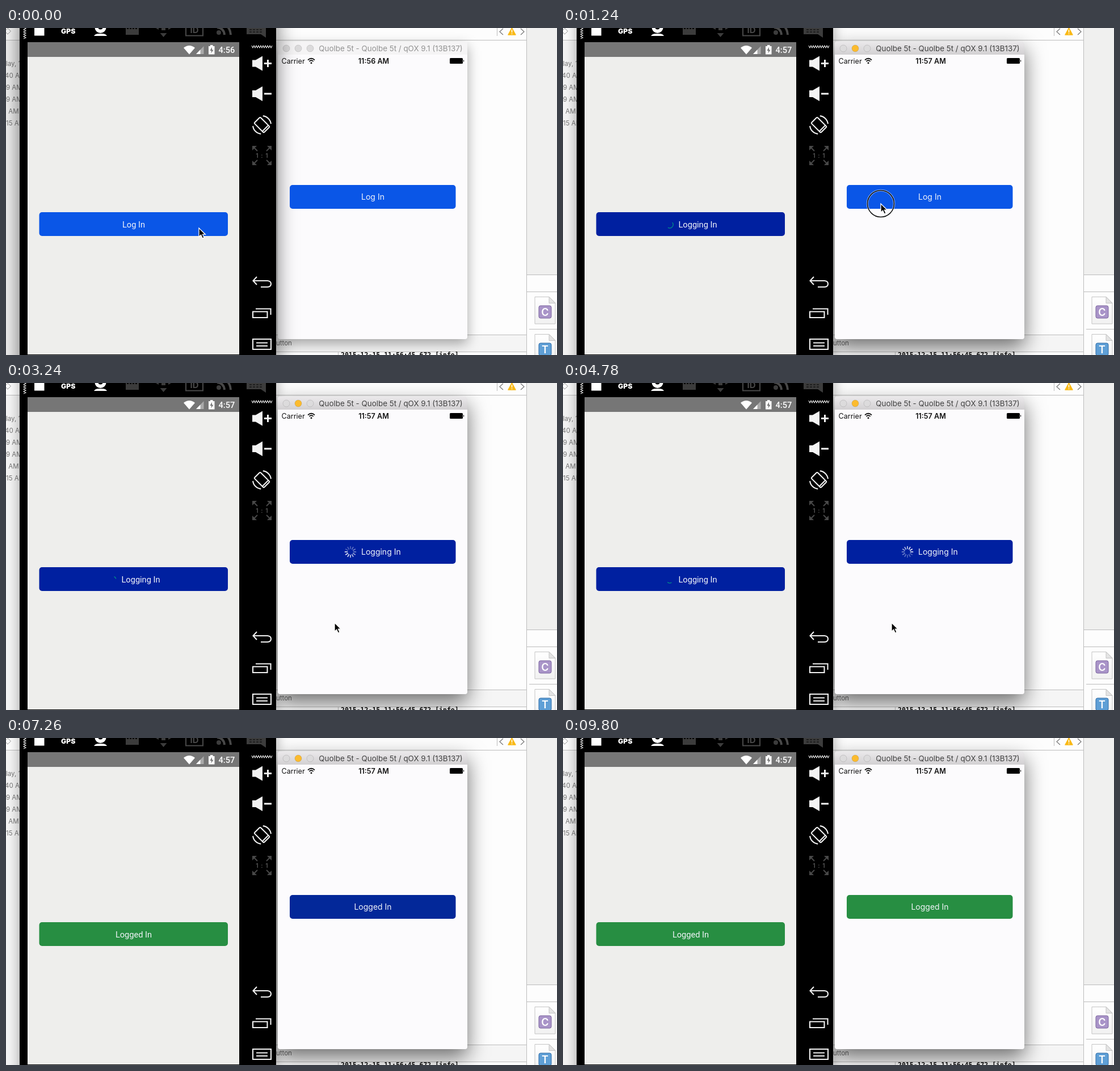
An HTML page for the animation above (9820 ms loop, 971 px wide and 577 px high).

```html
<!DOCTYPE html>
<html lang="en">
<head>
<meta charset="utf-8">
<title>Log in buttons</title>
<style>
html, body { margin: 0; width: 100%; height: 100%; overflow: hidden; background: #fdfdfd; }
svg { display: block; width: 971px; height: 577px; }
text { white-space: pre; }
.sf { font-family: Inter, sans-serif; }
.rb { font-family: Roboto, sans-serif; }
.mono { font-family: "DejaVu Sans Mono", monospace; }
.line { fill: none; stroke: #bcbcbc; }
.white { fill: none; stroke: #f0f0f0; stroke-width: 2.1; }
.dim { fill: none; stroke: #484848; stroke-width: 2; }
.mid { text-anchor: middle; }
.label { fill: #f3f5fa; }
.back { filter: drop-shadow(0 8px 11px rgba(0,0,0,.34)); }
.front { filter: drop-shadow(0 14px 18px rgba(0,0,0,.56)); }
</style>
</head>
<body>
<svg viewBox="0 0 971 577">
  <defs>
    <linearGradient id="bar" x2="0" y2="1">
      <stop stop-color="#ebe9eb"/><stop offset="1" stop-color="#d2d0d2"/>
    </linearGradient>
    <linearGradient id="page" x2="0" y2="1">
      <stop stop-color="#fff"/><stop offset="1" stop-color="#f1f1f1"/>
    </linearGradient>
  </defs>

  <!-- desktop behind the windows -->
  <rect width="971" height="577" fill="#fdfdfd"/>
  <rect y="22" width="24" height="555" fill="#f4f4f4"/>
  <path class="line" d="M0 21.500H917M865.500 0V14"/>
  <path d="M-2 5.500L3 .5L8.500 5.500L3 11Z" fill="none" stroke="#999"/>
  <g id="times" class="sf" font-size="11.5" fill="#777"></g>
  <path d="M876 1L870 6.500L876 12M907 1L913 6.500L907 12" fill="none" stroke="#777" stroke-width="1.2"/>
  <path d="M891.500 0L898 12H885Z" fill="#f9b916" stroke="#f9b916" stroke-width="1.5" stroke-linejoin="round"/>
  <path d="M891.500 3V8M891.500 9.500V11" stroke="#fff" stroke-width="1.5"/>
  <rect x="476" y="541" width="441" height="30" fill="#f5f5f5"/>
  <path class="line" d="M476 541.500H917M476 571.500H917M585.500 571V577"/>
  <text class="sf" x="476" y="560" font-size="11.5" fill="#666">utton</text>
  <text class="mono" x="590" y="581" font-size="11.5" font-weight="bold" fill="#111">2015-12-15 11:56:45.672 [info]</text>
  <rect x="918" width="53" height="436" fill="#f0f0ef"/>
  <path class="line" d="M917.500 0V577M918 435.500H971M918 465.500H971M922 531.500H971"/>
  <g id="files"></g>

  <!-- phone simulator -->
  <rect id="emuBack" class="back" x="24" y="-40" width="452" height="640"/>
  <rect id="sim" x="479" y="24" width="334" height="525" rx="4" fill="#fcfbfd"/>
  <path id="title" d="M479 47V28Q479 24 483 24H809Q813 24 813 28V47Z"/>
  <g id="dots" stroke-opacity=".12" stroke="#000"></g>
  <text id="name" class="sf mid" x="678" y="40.500" font-size="13.4">Quolbe 5t - Quolbe 5t / qOX 9.1 (13B137)</text>
  <text class="sf" x="485.500" y="62.500" font-size="12.6" fill="#111">Carrier</text>
  <g fill="none" stroke="#111" stroke-width="1.7">
    <path d="M532 56.500Q538 51 544 56.500M534.300 59Q538 55.500 541.700 59"/>
    <path d="M536.800 61L538 62.200L539.200 61" stroke-width="2"/>
  </g>
  <text id="clockB" class="sf mid" x="648" y="62.500" font-size="12.6" font-weight="600" fill="#111"></text>
  <rect x="782" y="53" width="23" height="10" rx="1.5"/>
  <path d="M806 56Q808.500 58 806 60Z"/>

  <!-- emulator -->
  <rect id="emu" x="24" y="-40" width="452" height="640"/>
  <rect x="38" y="25" width="373" height="551" fill="#eeeeec"/>
  <rect x="38" y="25" width="373" height="26" fill="#767676"/>
  <path d="M313 35Q323 27 333 35L323 46.500Z" fill="#fff"/>
  <path d="M335 46L348.500 32V46Z" fill="#aaa"/>
  <path d="M335 46L342.500 38.300V46Z" fill="#fff"/>
  <path d="M357 32H360V30H364.500V32H367.500V46.500H357Z" fill="#fff"/>
  <path d="M363 33.500L359.500 40H362L361.500 44.500L365.500 38.500H363Z" fill="#767676"/>
  <text id="clockA" class="rb" x="374.500" y="44" font-size="14.6" font-weight="500" fill="#fff"></text>

  <!-- emulator toolbar -->
  <path id="grips" fill="none" stroke="#ddd" stroke-width="1.2"/>
  <rect x="50" y="-4" width="17.500" height="17.500" fill="#fff"/>
  <text class="sf" x="97" y="9.800" font-size="12.2" font-weight="900" fill="#fff">GPS</text>
  <circle cx="166.500" cy="-1" r="10" fill="#fff"/>
  <circle cx="166.500" cy="-2" r="4.500"/>
  <path d="M155 14Q157 10.500 162 10H171Q176 10.500 178 14Z" fill="#fff"/>
  <g fill="#3c3c3c">
    <path d="M211 -4H234V12H211ZM262 -1L269 -5V3ZM293 -1L286 -5V3ZM277.500 16L271.500 9H283.500ZM274 -4H281V4H274ZM424 -4H458V17L449 11H424Z"/>
    <circle cx="375" cy="8" r="4"/>
  </g>
  <path d="M213 1H232" stroke="#000" stroke-width="2" stroke-dasharray="3 2"/>
  <path class="dim" d="M317 -4V13.500H347V-4"/>
  <text class="sf mid" x="332" y="9" font-size="15" font-weight="700" fill="#484848">ID</text>
  <path class="dim" d="M372 -1Q384 0 385 12M378 -9Q395 -5 396 12" style="stroke-width:4"/>
  <path d="M429 3H452M429 7H452" stroke="#000" stroke-dasharray="4 2"/>

  <!-- emulator side buttons -->
  <g id="speakers"></g>
  <path d="M455 62.500H468M461.500 56V69M455 116H468" stroke="#f4f4f4" stroke-width="3"/>
  <g transform="translate(451 171) rotate(-45)">
    <rect class="white" x="-7.500" y="-12" width="15" height="24" rx="1.500"/>
    <path class="white" d="M-7 8.500H7"/>
    <path class="white" d="M-12.500 -10A16 16 0 0 0 -12.500 10M12.500 -10A16 16 0 0 1 12.500 10"/>
  </g>
  <g id="corners"></g>
  <text class="sf mid" x="451.500" y="229" font-size="10.500" font-weight="600" letter-spacing="1" fill="#555">1 : 1</text>
  <path class="white" d="M442 439L435.500 446L442 453M436 446H461Q467 446.500 467 451.500T461 457H449"/>
  <path class="white" d="M435 500.500H460.500V511H435ZM440 495.500H466.500V506"/>
  <path class="white" d="M435 549H467V567H435ZM441 555.500H461M441 561H461"/>

  <!-- the two buttons -->
  <rect id="btnA" x="58.500" y="325" width="332.500" height="42" rx="5"/>
  <text id="textA" class="rb label" y="352.300" font-size="14.6"></text>
  <path id="arc" fill="none" stroke="#008f86" stroke-width="1.300"/>
  <rect id="btnB" x="500" y="277" width="292.500" height="42" rx="5"/>
  <text id="textB" class="sf label" y="303.200" font-size="14"></text>
  <g id="spokes" stroke="#fff" stroke-width="1.700" stroke-linecap="round"></g>

  <g id="pointer">
    <g id="ring" fill="none">
      <circle r="23.500" stroke="#fff" stroke-width="3.600" stroke-opacity=".55"/>
      <circle r="23.500" stroke="#111" stroke-width="1.600"/>
    </g>
    <path d="M0 0V15.500L3.600 12.200L6.200 18L9 16.800L6.500 11.200H11.300Z" stroke="#fff" stroke-width="1.300"/>
  </g>
</svg>
<script>
const LOOP = 9820;
const BLUE = [10, 86, 231], NAVY = [0, 32, 160], GREEN = [39, 142, 66];
const $ = id => document.getElementById(id);
const set = (id, attrs) => {
  for (const k in attrs) $(id).setAttribute(k, attrs[k]);
};
const clamp = x => Math.max(0, Math.min(1, x));
const mix = (a, b, p) => a + (b - a) * p;
const show = (id, on) => { $(id).style.display = on ? '' : 'none'; };
const write = (id, s) => { if ($(id).textContent !== s) $(id).textContent = s; };

function buildStatic() {
  $('times').innerHTML = ['lay, 1', '40 A', '9 AM', '9 AM', ' AM', '15 AM']
    .map((s, i) => `<text x="${[0, -2, 0, 0, 1, 0][i]}" y="${67 + i * 20.9}">${s}</text>`).join('');

  $('files').innerHTML = [['C', 474, '#a994c8', '#7c66a0'], ['T', 540, '#5f9fd6', '#2e6da8']]
    .map(([s, y, fill, edge]) => `<g transform="translate(932 ${y})">
      <path d="M0 .5H25L36 11.500V48H0Z" fill="url(#page)" stroke="#c4c4c4"/>
      <path d="M25 .5V11.500H36Z" fill="#e4e4e4" stroke="#c4c4c4"/>
      <rect x="7" y="16" width="22" height="22" rx="3" fill="${fill}" stroke="${edge}"/>
      <text class="sf mid" x="18" y="33.500" font-size="18" font-weight="600" fill="#fff">${s}</text></g>`).join('');

  $('speakers').innerHTML = [62.5, 116]
    .map(y => `<path d="M434 ${y - 6}H440L452 ${y - 13}V${y + 13}L440 ${y + 6}H434Z" fill="#f4f4f4"/>`).join('');

  $('corners').innerHTML = [[1, 1], [-1, 1], [1, -1], [-1, -1]]
    .map(([x, y]) => `<g transform="translate(451 225) scale(${x} ${y})">
      <path class="dim" d="M8 8L14 14"/><path d="M17 9V17H9Z" fill="#484848"/></g>`).join('');

  let grips = 'M433 31';
  for (let i = 0; i < 9; i++) grips += 'l2 4l2 -4';
  grips += 'M31 -1';
  for (let i = 0; i < 5; i++) grips += 'l4 2l-4 2';
  set('grips', { d: grips });

  $('dots').innerHTML = [494, 515, 536].map(x => `<circle cx="${x}" cy="36" r="6"/>`).join('');
  $('spokes').innerHTML = Array.from({ length: 12 }, (_, i) =>
    `<path d="M0 -5.500V-9.500" transform="translate(607 298) rotate(${i * 30})"/>`).join('');
}

// Idle -> busy -> done, with a short colour fade at each change.
function button(k, t, busy, done, xs) {
  const toNavy = clamp((t - busy) / 250), toGreen = clamp((t - done) / 300);
  const rgb = BLUE.map((c, i) => Math.round(mix(mix(c, NAVY[i], toNavy), GREEN[i], toGreen)));
  const state = t < busy ? 0 : t < done ? 1 : 2;
  set('btn' + k, { fill: `rgb(${rgb})` });
  set('text' + k, { x: xs[state], 'text-anchor': state === 1 ? 'start' : 'middle' });
  write('text' + k, ['Log In', 'Logging In', 'Logged In'][state]);
  return state === 1;
}

function drawArc(t) {
  const sweep = 105 + 55 * Math.cos((t - 1240) / 1333 * 2 * Math.PI);
  const centre = 40 + (t - 1240) * .32;
  const at = deg => {
    const a = deg * Math.PI / 180;
    return `${188 + 6 * Math.cos(a)} ${347 + 6 * Math.sin(a)}`;
  };
  set('arc', { d: `M${at(centre - sweep / 2)}A6 6 0 0 1 ${at(centre + sweep / 2)}` });
}

function drawSpokes(t) {
  const head = Math.floor((t - 3240) / 1000 * 12 + 9.5);
  [...$('spokes').children].forEach((s, i) => {
    const age = ((head - i) % 12 + 12) % 12;
    s.setAttribute('opacity', Math.max(.3, 1 - age * .08));
  });
}

// time, x, y
const PATH = [[0, 340, 353], [380, 340, 353], [1000, 560, 310], [1450, 560, 310],
  [1950, 579, 423], [6560, 579, 423], [6900, 690, -30]];

function pointerAt(t) {
  const i = PATH.findIndex(p => p[0] > t);
  if (i < 0) return PATH[PATH.length - 1].slice(1);
  const a = PATH[i - 1], b = PATH[i];
  const p = (t - a[0]) / (b[0] - a[0]), e = p * p * (3 - 2 * p);
  return [mix(a[1], b[1], e), mix(a[2], b[2], e)];
}

function render(t) {
  const late = t >= 600, active = t >= 1160;
  write('clockA', late ? '4:57' : '4:56');
  write('clockB', late ? '11:57 AM' : '11:56 AM');

  // The window in front casts the larger shadow, also over the other one.
  show('emuBack', active);
  set('emu', { class: active ? '' : 'front' });
  set('sim', { class: active ? 'front' : 'back' });
  set('title', { fill: active ? 'url(#bar)' : '#f5f4f5' });
  set('name', { fill: active ? '#404040' : '#929292' });
  [...$('dots').children].forEach((d, i) =>
    d.setAttribute('fill', active && i === 1 ? '#fcbb2e' : '#dcdbdc'));

  const busyA = button('A', t, 180, 6080, [225, 203.5, 225]);
  const busyB = button('B', t, 1340, 7240, [646.5, 626, 646.5]);
  show('arc', busyA);
  show('spokes', busyB);
  if (busyA) drawArc(t);
  if (busyB) drawSpokes(t);

  set('pointer', { transform: `translate(${pointerAt(t).join(' ')})` });
  show('pointer', t < 6900);
  show('ring', (t >= 60 && t < 200) || (t >= 1160 && t < 1340));
}

buildStatic();
const start = performance.now();
function tick() {
  render((performance.now() - start) % LOOP);
  requestAnimationFrame(tick);
}
tick();
</script>
</body>
</html>
```
